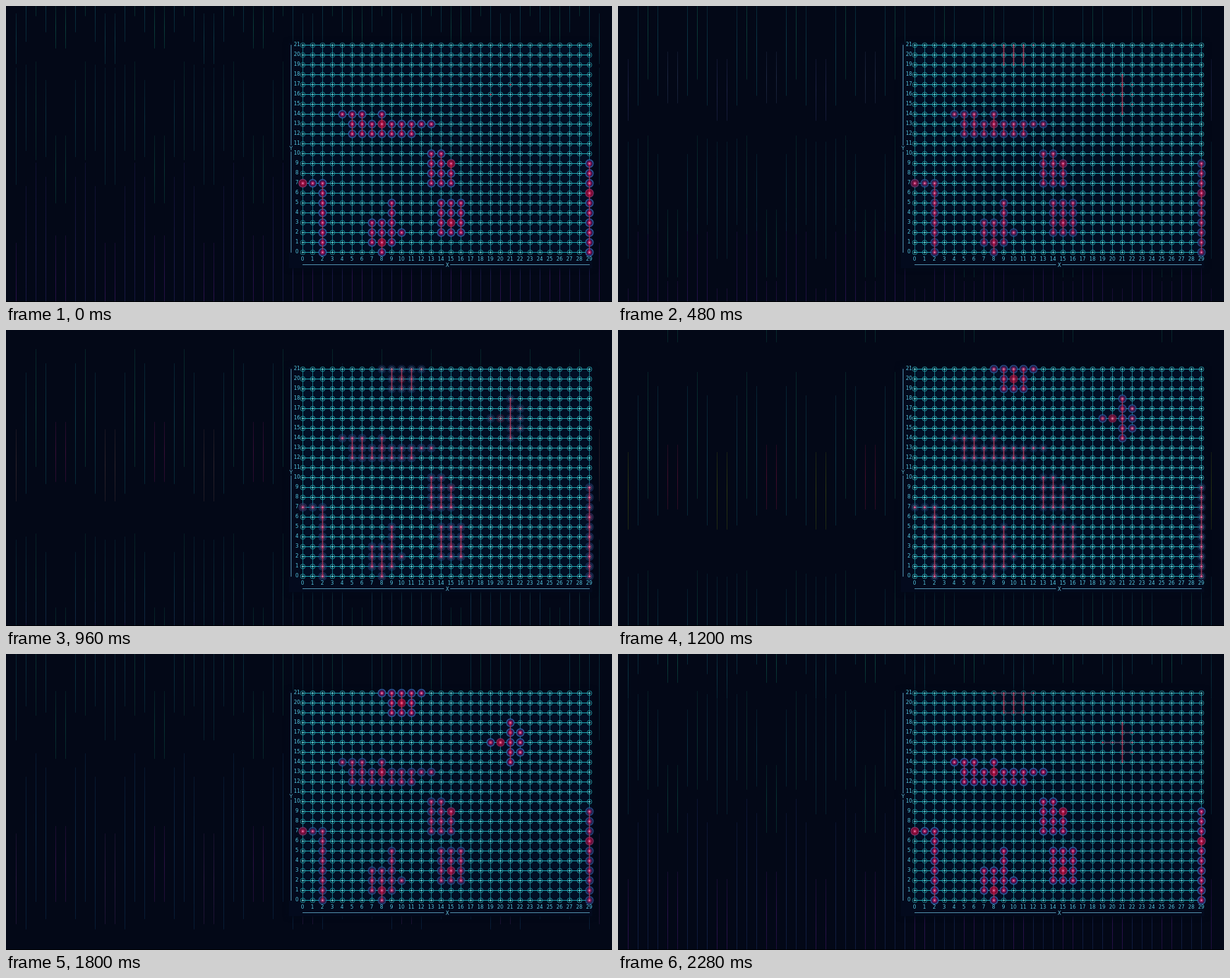
Recreate the animation shown at these times as an HTML page without scripts. Size 981 by 480 pixels, loop 2400 ms.

```html
<!DOCTYPE html>
<html lang="en">
<head>
<meta charset="utf-8">
<title>Grid monitor</title>
<style>
html, body { margin: 0; width: 100%; height: 100%; overflow: hidden; background: #030817; }
#stage { position: absolute; left: 0; top: 0; width: 981px; height: 480px; overflow: hidden; background: #030817; }

/* rain: each box draws two mirrored columns, repeated every 160px */
.rain i {
  position: absolute; left: 16px; width: 945px; transform-origin: 0 0; color: var(--c);
  background: linear-gradient(90deg, transparent var(--l), currentColor var(--l) calc(var(--l) + 1px),
    transparent calc(var(--l) + 1px) var(--r), currentColor var(--r) calc(var(--r) + 1px),
    transparent calc(var(--r) + 1px)) 0 0 / 160px 100%;
  -webkit-mask-image: linear-gradient(#0008, #000 50%, #000a);
  mask-image: linear-gradient(#0008, #000 50%, #000a);
}
.a { --l: 0px;  --r: 144px; --pt: 12px;   --ph: 109px; --qt: 100px; --qh: 190px; --c: #0b3a48; --hot: #303d12; }
.b { --l: 16px; --r: 128px; --pt: -80px;  --ph: 183px; --qt: 95px;  --qh: 140px; --c: #0b3a4a; }
.c { --l: 32px; --r: 112px; --pt: -118px; --ph: 178px; --qt: 90px;  --qh: 160px; --c: #0a403c; }
.d { --l: 48px; --r: 96px;  --pt: -95px;  --ph: 182px; --qt: 120px; --qh: 125px; --c: #0a3d4c; }
.e { --l: 64px; --r: 80px;  --pt: 0px;    --ph: 91px;  --qt: 210px; --qh: 110px; --c: #0a443f; --hot: #4a0d2c; }
.rain .p { top: var(--pt); height: var(--ph); animation: grow 4.8s steps(40) -1.2s infinite, cool 4.8s linear -1.2s infinite; }
.rain .p.z { animation-delay: -3.6s; }
.rain .p.a, .rain .p.e { animation-name: grow, warm; }
.rain .q { top: var(--qt); height: var(--qh); opacity: .8; animation: fall 4.8s steps(40) infinite; }
.rain .q.z { animation-delay: -2.4s; }
@keyframes grow { from { transform: translateY(-186px) scaleY(.36); } to { transform: translateY(558px) scaleY(1.95); } }
@keyframes fall { from { transform: translateY(-600px); } to { transform: translateY(600px); } }
@keyframes cool { 0%, 50% { color: var(--c); } 62%, 70% { color: #0b2a4a; } 78%, 100% { color: #271250; } }
@keyframes warm { 0%, 30% { color: var(--c); } 40% { color: #32104a; } 50%, 56% { color: var(--hot); } 64%, 100% { color: #2c1250; } }

#cover { position: absolute; left: 458px; top: 60px; width: 491px; height: 365px; background: #030a1d; box-shadow: 0 0 7px 2px #030918; }
#bar { position: absolute; left: 0; bottom: 0; width: 100%; height: 1px; background: #000; }
svg { position: absolute; left: 0; top: 0; }

.nums { position: absolute; font: 8px/16px "DejaVu Sans", sans-serif; color: #55c8e2; text-align: center; }
#ys { left: 461px; top: 55px; width: 20px; white-space: pre; }
#xs { left: 472px; top: 403px; display: flex; }
#xs b { width: 16px; font-weight: normal; }
.name { font: 8px "DejaVu Sans", sans-serif; fill: #67c4dc; text-anchor: middle; }

.dot { stroke-dasharray: 0 1; stroke-linecap: round; }
#nodes { animation: nodes 2.4s infinite; }
#ringA { animation: ringA 2.4s infinite; }
#hotA { animation: hotA 2.4s infinite; }
#ringB { animation: ringB 2.4s infinite; }
#wireB { animation: wireB 2.4s step-end infinite; }
#linkB { animation: linkB 2.4s step-end infinite; }

@keyframes nodes {
  0% { opacity: .85; animation-timing-function: steps(6); }
  30% { opacity: .95; animation-timing-function: steps(4); }
  50%, 65% { opacity: 1; animation-timing-function: steps(6); }
  95%, 100% { opacity: .8; }
}
@keyframes ringA {
  0%, 10% { opacity: 1; animation-timing-function: steps(4); }
  30% { opacity: .58; animation-timing-function: steps(4); }
  50% { opacity: .28; animation-timing-function: steps(3); }
  65% { opacity: .62; animation-timing-function: steps(2); }
  75% { opacity: .78; animation-timing-function: steps(4); }
  95%, 100% { opacity: 1; }
}
@keyframes hotA {
  0% { opacity: 1; animation-timing-function: steps(2); }
  10% { opacity: .85; animation-timing-function: steps(4); }
  30% { opacity: .35; animation-timing-function: steps(4); }
  50% { opacity: 0; animation-timing-function: steps(3); }
  65% { opacity: .5; animation-timing-function: steps(2); }
  75% { opacity: .8; animation-timing-function: steps(4); }
  95%, 100% { opacity: 1; }
}
@keyframes ringB {
  0%, 35% { opacity: 0; animation-timing-function: steps(3); }
  50% { opacity: .85; animation-timing-function: steps(3); }
  65% { opacity: .35; animation-timing-function: steps(2); }
  75% { opacity: 1; animation-timing-function: steps(4); }
  95%, 100% { opacity: 0; }
}
@keyframes wireB { 0% { opacity: 0; } 5% { opacity: 1; } 25% { opacity: 0; } 40%, 100% { opacity: 1; } }
@keyframes linkB { 0% { opacity: 0; } 90%, 100% { opacity: .8; } }
</style>
</head>
<body>
<div id="stage">
  <div class="rain">
    <i class="a p"></i><i class="a p z"></i><i class="a q"></i><i class="a q z"></i>
    <i class="b p"></i><i class="b p z"></i><i class="b q"></i><i class="b q z"></i>
    <i class="c p"></i><i class="c p z"></i><i class="c q"></i><i class="c q z"></i>
    <i class="d p"></i><i class="d p z"></i><i class="d q"></i><i class="d q z"></i>
    <i class="e p"></i><i class="e p z"></i><i class="e q"></i><i class="e q z"></i>
  </div>
  <div id="cover"></div>
  <div id="bar"></div>

  <svg width="981" height="480" viewBox="0 0 981 480">
    <defs>
      <pattern id="mesh" x="472" y="55" width="16" height="16" patternUnits="userSpaceOnUse">
        <path d="M8.5 0v16" stroke="#15808e"/>
        <path d="M0 8.5h16" stroke="#1fb4bf"/>
      </pattern>
      <pattern id="node" x="472" y="55" width="16" height="16" patternUnits="userSpaceOnUse">
        <circle cx="8.5" cy="8.5" r="3.8" fill="none" stroke="#24a4ac"/>
        <path d="M6.5 8.5h4M8.5 6.5v4" stroke="#7df0ee"/>
      </pattern>
      <path id="cellsA" d="M0 7h.01M1 7h.01M2 0v7.01M4 14h.01M5 12v2.01M6 12v2.01M7 12v1.01M8 12v2.01M9 12v1.01M10 12v1.01M11 12v1.01M12 13h.01M13 13h.01M7 1v2.01M8 0v3.01M9 1v4.01M10 2h.01M13 7v3.01M14 7v3.01M15 7v2.01M14 2v3.01M15 2v3.01M16 2v3.01M29 0v9.01"/>
      <path id="cellsB" d="M8 21h.01M9 19v2.01M10 19v2.01M11 19v2.01M12 21h.01M19 16h.01M20 16h.01M21 14v4.01M22 15h.01M22 16h.01M22 17h.01"/>
      <path id="coreA" d="M0 7h.01M8 13h.01M8 1h.01M15 9h.01M15 3h.01M29 6h.01"/>
      <path id="coreB" d="M10 20h.01M20 16h.01"/>
    </defs>

    <rect x="480" y="63" width="465" height="337" fill="#020e24"/>
    <rect x="480" y="63" width="465" height="337" fill="url(#mesh)"/>
    <rect id="nodes" x="472" y="55" width="480" height="352" fill="url(#node)"/>

    <g transform="translate(480.5 399.5) scale(16 -16)" fill="none">
      <g id="ringA" class="dot">
        <use href="#cellsA" stroke="#4f8cf0" stroke-width=".82"/>
        <use href="#cellsA" stroke="#120c30" stroke-width=".69"/>
        <use href="#cellsA" stroke="#7a1458" stroke-width=".5"/>
      </g>
      <g id="hotA" class="dot">
        <use href="#coreA" stroke="#c41848" stroke-width=".82"/>
        <use href="#coreA" stroke="#520a2c" stroke-width=".69"/>
        <use href="#coreA" stroke="#9c1242" stroke-width=".5"/>
      </g>
      <use href="#cellsA" stroke="#f01c3e" stroke-width=".07"/>
      <g class="dot">
        <use href="#cellsA" stroke="#b8306c" stroke-width=".24"/>
        <use href="#cellsA" stroke="#ffb8dc" stroke-width=".12"/>
      </g>

      <g id="ringB" class="dot">
        <use href="#cellsB" stroke="#4f8cf0" stroke-width=".82"/>
        <use href="#cellsB" stroke="#120c30" stroke-width=".69"/>
        <use href="#cellsB" stroke="#7a1458" stroke-width=".5"/>
        <use href="#coreB" stroke="#c41848" stroke-width=".82"/>
        <use href="#coreB" stroke="#520a2c" stroke-width=".69"/>
        <use href="#coreB" stroke="#9c1242" stroke-width=".5"/>
        <use href="#cellsB" stroke="#ffb8dc" stroke-width=".18"/>
      </g>
      <path id="linkB" d="M8 21h4M9 20h2M9 19h2M19 16h3M21 17h1M21 15h1" stroke="#8a1a3c" stroke-width=".063"/>
      <g id="wireB">
        <use href="#cellsB" stroke="#f01c3e" stroke-width=".07"/>
        <use href="#cellsB" class="dot" stroke="#e8587c" stroke-width=".14"/>
      </g>
      <path class="dot" d="M19 16h.01M21 17h.01" stroke="#c8445c" stroke-width=".15"/>
    </g>

    <path d="M461.5 63v163M461.5 236v164M480 419.5h229M719 419.5h226" stroke="#5a9fbd"/>
    <text class="name" x="461.5" y="234">Y</text>
    <text class="name" x="714.5" y="422.5">X</text>
  </svg>

  <div id="ys" class="nums">21
20
19
18
17
16
15
14
13
12
11
10
9
8
7
6
5
4
3
2
1
0</div>
  <div id="xs" class="nums"><b>0</b><b>1</b><b>2</b><b>3</b><b>4</b><b>5</b><b>6</b><b>7</b><b>8</b><b>9</b><b>10</b><b>11</b><b>12</b><b>13</b><b>14</b><b>15</b><b>16</b><b>17</b><b>18</b><b>19</b><b>20</b><b>21</b><b>22</b><b>23</b><b>24</b><b>25</b><b>26</b><b>27</b><b>28</b><b>29</b></div>
</div>
</body>
</html>
```
